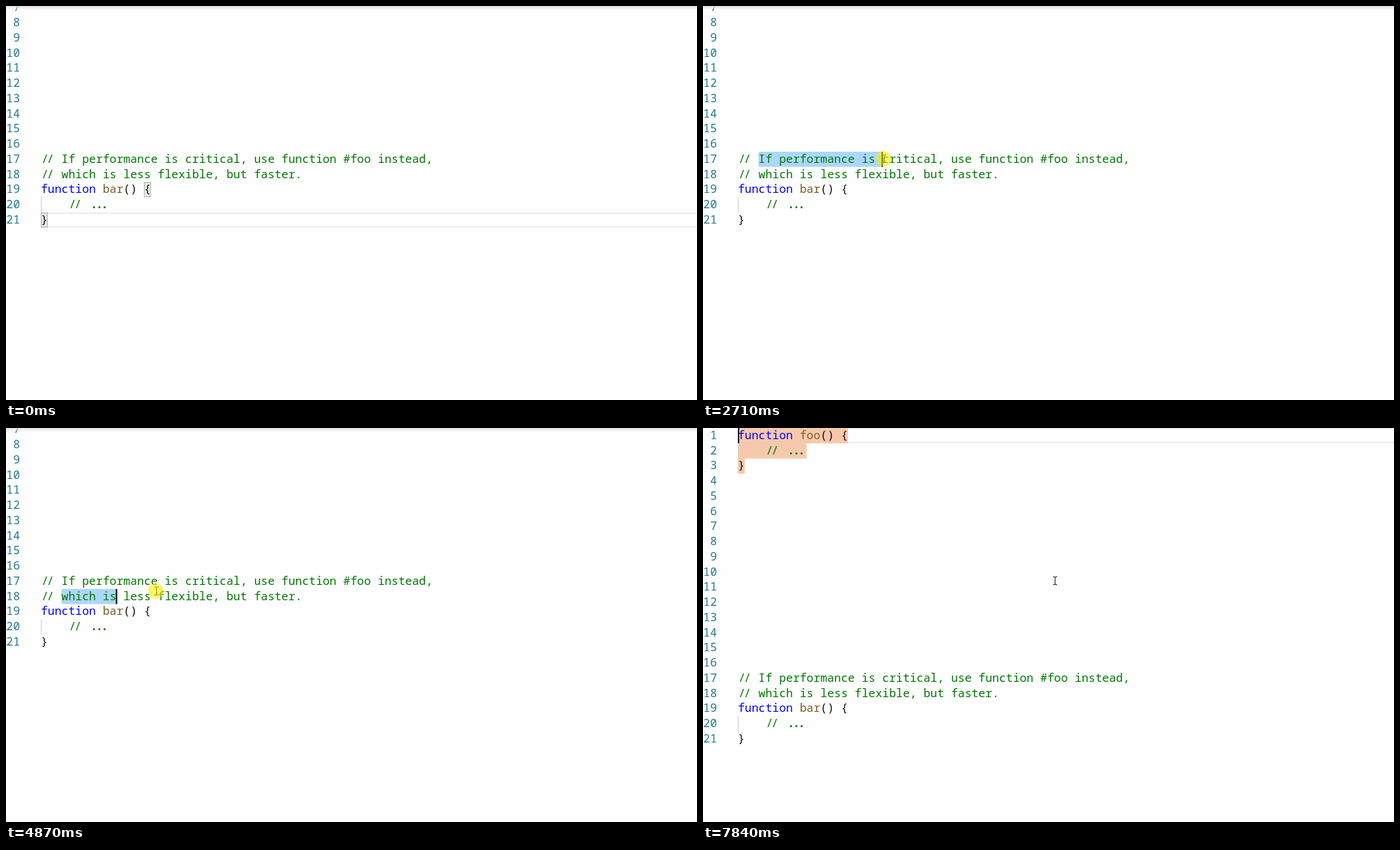
An HTML page with a canvas that plays this animation: 991x565 px, repeating every 8 s.

```html
<!DOCTYPE html>
<html lang="en">
<head>
<meta charset="utf-8">
<title>Editor link demo</title>
<style>
html, body { margin: 0; height: 100%; overflow: hidden; background: #fefefe; }
canvas { display: block; }
</style>
</head>
<body>
<canvas id="stage" width="991" height="565"></canvas>
<script>
const ctx = document.getElementById('stage').getContext('2d');
const LOOP = 8000, LEFT = 50, CHAR = 9.86, ROW = 21.75, SCROLL = 139;
const ENTER = 140, LINK = 7200, JUMP = 7760, LAG = 22;
const GREEN = '#007800', BLUE = '#0000ff', BROWN = '#795e26', BLACK = '#111';

const body = name => [`function ${name}() {`, '    // ...', '}'];
const LINES = [
  ...body('foo'),
  ...Array(13).fill(''),
  '// If performance is critical, use function #foo instead,',
  '// which is less flexible, but faster.',
  ...body('bar'),
];

// Pointer moves: start, end, target x, target y, sag of the path
const MOVES = [
  [ENTER, 830, 73, 258, -258],
  [1000, 1840, 88, 219, 0],
  [2120, 2550, 260, 219, 0],
  [2770, 3760, 647, 217, 16],
  [3870, 4330, 86, 241, 80],
  [4780, 5000, 435, 234, -10],
  [5400, 5700, 532, 237, 30],
  [6200, 6650, 505, 219, 0],
];
const PRESSES = [[1840, 3870], [4560, 5250], [5800, 5890], [7590, 7670]];

function pointer(t) {
  let x = 827, y = 543;
  for (const [start, end, tx, ty, sag] of MOVES) {
    if (t <= start) break;
    const u = Math.min(1, (t - start) / (end - start));
    const s = u * u * (3 - 2 * u);
    x += (tx - x) * s;
    y += (ty - y) * s + 2 * s * (1 - s) * sag;
  }
  return [x, y];
}

let scroll = 0;
const colX = col => LEFT + col * CHAR;
const rowY = row => (row - 1) * ROW - scroll;

// Text position under the pointer, kept on the given row while dragging
function hit(t, lockedRow) {
  const [x, y] = pointer(t);
  const row = lockedRow || Math.floor((y + scroll) / ROW) + 1;
  const col = Math.floor((x - LEFT) / CHAR);
  return [row, Math.max(0, Math.min(LINES[row - 1].length, col))];
}

function caretAt(t) {
  if (t >= JUMP) return { row: 1, anchor: 0, head: 0, visible: true };
  const press = PRESSES.findLast(([down]) => t >= down);
  if (!press) return null;
  const [down, up] = press;
  const [row, anchor] = hit(down);
  const [, head] = hit(Math.max(down, Math.min(t, up) - LAG), row);
  const idle = Math.max(0, t - up + 100);
  return { row, anchor, head, visible: Math.floor(idle / 500) % 2 === 0 };
}

function rect(x, y, w, h, color) {
  ctx.fillStyle = color;
  ctx.fillRect(x, y, w, h);
}

const setFont = weight => {
  ctx.font = `${weight} 16.45px "Noto Sans Mono", monospace`;
};

function drawLine(row, linked) {
  const line = LINES[row - 1], isComment = line.includes('//');
  for (const { 0: token, index } of line.matchAll(/\/\/|\.{3}|\w+|[^\s\w]/g)) {
    const isWord = /\w/.test(token);
    const isLink = linked && isComment && token === 'foo';
    ctx.fillStyle = isLink || (!isComment && token === 'function') ? BLUE
      : isComment ? GREEN : isWord ? BROWN : BLACK;
    // Ligatures pull their glyphs together
    const tighten = isWord ? 0 : 2.2, mid = (token.length - 1) / 2;
    setFont(token === '...' ? 800 : 500);
    [...token].forEach((ch, i) =>
      ctx.fillText(ch, colX(index + i) + (mid - i) * tighten, rowY(row) + 15.8));
    if (isLink) rect(colX(index), rowY(row) + 17.5, token.length * CHAR, 1.3, BLUE);
  }
  if (line.startsWith(' ')) rect(LEFT, rowY(row), 1, ROW, '#d0d0d0');
}

function lineHighlight(row) {
  for (const dy of [0, ROW - 2]) rect(LEFT, rowY(row) + dy, 941, 2, '#ececec');
}

function bracketBox(row, col) {
  rect(colX(col), rowY(row), CHAR, ROW, '#e5efe5');
  ctx.strokeStyle = '#b9b9b9';
  ctx.lineWidth = 1.3;
  ctx.strokeRect(colX(col) + 0.6, rowY(row) + 0.6, CHAR - 1.2, ROW - 1.2);
}

function selection({ row, anchor, head }) {
  ctx.fillStyle = '#add6ff';
  ctx.beginPath();
  ctx.roundRect(colX(anchor), rowY(row), (head - anchor) * CHAR, ROW, 3);
  ctx.fill();
}

function drawPointer(x, y, pressed) {
  ctx.strokeStyle = '#333';
  ctx.lineWidth = 1.2;
  ctx.beginPath();
  for (const side of [-1, 1]) {
    ctx.moveTo(x - 3, y + side * 6);
    ctx.lineTo(x, y + side * 5.2);
    ctx.lineTo(x + 3, y + side * 6);
  }
  ctx.moveTo(x, y - 5.2);
  ctx.lineTo(x, y + 5.2);
  ctx.stroke();
  if (!pressed) return;
  ctx.fillStyle = 'rgba(248, 236, 0, 0.58)';
  ctx.beginPath();
  ctx.arc(x - 1, y, 11, 0, 2 * Math.PI);
  ctx.fill();
}

function draw(t) {
  const jumped = t >= JUMP;
  scroll = jumped ? 0 : SCROLL;
  const caret = caretAt(t);
  rect(0, 0, 991, 565, '#fefefe');

  if (!caret) {
    lineHighlight(21);
    bracketBox(19, 15);
    bracketBox(21, 0);
  } else if (caret.head === caret.anchor) {
    lineHighlight(caret.row);
  } else {
    selection(caret);
  }

  LINES.forEach((line, i) => {
    const row = i + 1;
    if (jumped && row <= 3) {
      rect(LEFT, rowY(row), line.length * CHAR, ROW + 0.3, '#f6c9ad');
    }
    drawLine(row, t >= LINK && !jumped);
    setFont(400);
    ctx.fillStyle = '#237893';
    ctx.textAlign = 'right';
    ctx.fillText(row, 20, rowY(row) + 15.8);
    ctx.textAlign = 'left';
  });

  if (caret?.visible) {
    rect(Math.max(LEFT, colX(caret.head) - 1), rowY(caret.row), 2, ROW, '#000');
  }
  if (!jumped) {
    const shade = ctx.createLinearGradient(0, 0, 0, 6);
    shade.addColorStop(0, '#dddd');
    shade.addColorStop(1, '#ddd0');
    rect(0, 0, 991, 6, shade);
  }
  if (t >= ENTER) {
    drawPointer(...pointer(t), PRESSES.some(([down, up]) => t >= down && t < up));
  }
}

function tick() {
  draw(performance.now() % LOOP);
  requestAnimationFrame(tick);
}
tick();
</script>
</body>
</html>
```
